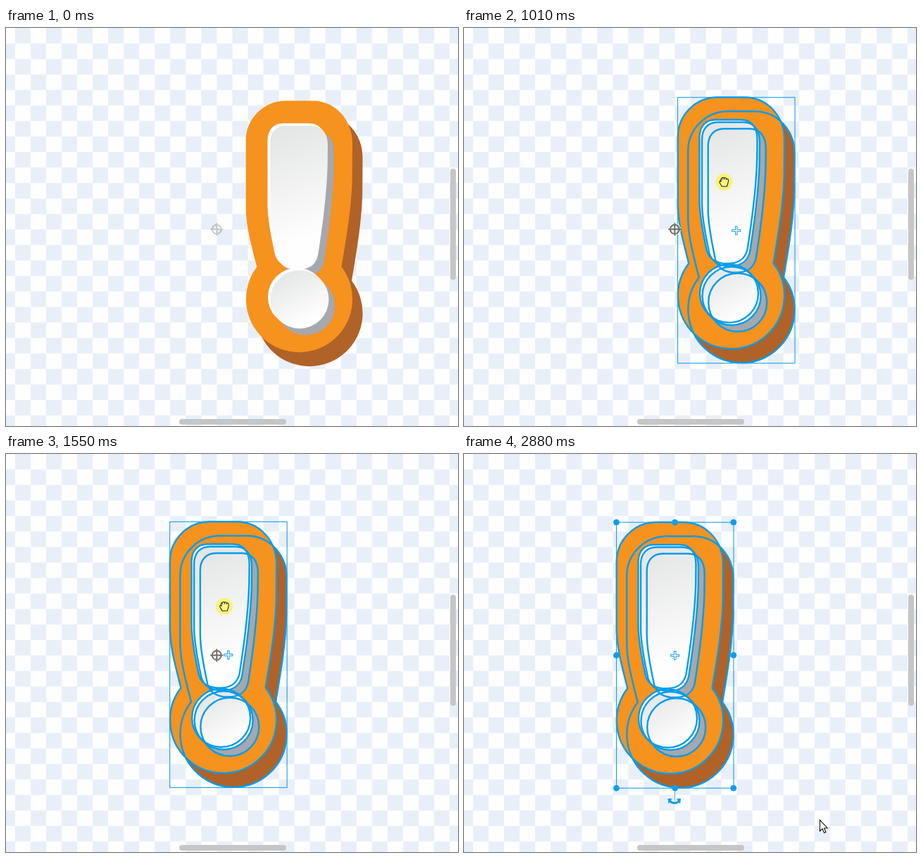
An HTML page for the animation above (2950 ms loop, 642 px wide and 566 px high).

```html
<!DOCTYPE html>
<html lang="en">
<head>
<meta charset="utf-8">
<title>Drag to centre</title>
<style>
  html, body { margin: 0; width: 100%; height: 100%; overflow: hidden; background: #fefefe; }
  svg { display: block; width: 642px; height: 566px; }
  .lines, .arc { fill: none; stroke: #049cec; stroke-width: 2.4; stroke-linejoin: round; }
  .arc { stroke-width: 3; }
  .box { fill: none; stroke: #149fee; stroke-width: 1.1; }
  #handles circle { fill: #119ded; }
  .bar { fill: #c6c6c6; }
  #target { fill: none; }
</style>
</head>
<body>
<svg viewBox="0 0 642 566">
  <defs>
    <pattern id="checks" x="12.9" y="0" width="44.08" height="44.08" patternUnits="userSpaceOnUse">
      <path fill="#e8eff8" d="M0 0h22.04v22.04H0zM22.04 22.04h22.04v22.04h-22.04z"/>
    </pattern>
    <linearGradient id="stemShade" gradientUnits="userSpaceOnUse" x1="390" y1="135" x2="445" y2="290">
      <stop offset="0" stop-color="#e3e5e4"/><stop offset="1" stop-color="#fefefe"/>
    </linearGradient>
    <linearGradient id="dotShade" x1=".25" y1=".1" x2=".65" y2=".85">
      <stop offset="0" stop-color="#e6e7e7"/><stop offset="1" stop-color="#fefefe"/>
    </linearGradient>
    <path id="body" d="M397 103.5H435C470 103.5 492 133 492 163L491.7 218C490 262 483 300 476.5 339.6A75.6 75.6 0 1 1 356.3 339.8C347 303 340.7 280 340.7 254V160C340.7 129 366 103.5 397 103.5Z"/>
    <path id="stem" d="M394 135.5H430C446 135.5 453.5 147 453.5 164L453.2 192C452 235 445 285 439.5 320C436 334 427 340 411 340C396 340 386 335 382 322C375 290 371.5 268 371.5 250V160C371.5 145 380 135.5 394 135.5Z"/>
    <circle id="dot" cx="413.5" cy="382.5" r="41.5"/>
    <g id="pair"><use href="#stem"/><use href="#dot"/></g>
    <path id="sight" d="M290.3 286.3h18M299.3 277.3v18M292.8 286.3a6.5 6.5 0 1 0 13 0a6.5 6.5 0 1 0-13 0"/>
  </defs>

  <rect width="642" height="566" fill="url(#checks)"/>

  <g id="mark">
    <use href="#body" x="14.5" y="20" fill="#b06228"/>
    <use href="#body" fill="#f6921e"/>
    <use href="#pair" x="12.2" y="12.8" fill="#a5a8ad"/>
    <use href="#stem" fill="#fff"/>
    <use href="#stem" x="3.5" y="3.5" fill="url(#stemShade)"/>
    <use href="#dot" fill="#fff"/>
    <use href="#dot" x="3.5" y="3.5" fill="url(#dotShade)"/>
    <g id="selection">
      <g class="lines">
        <use href="#body"/>
        <use href="#body" x="14.5" y="20"/>
        <use href="#pair"/>
        <use href="#pair" x="3.5" y="3.5"/>
        <use href="#pair" x="12.2" y="12.8"/>
      </g>
      <rect class="box" x="340.5" y="103.7" width="166.5" height="378"/>
    </g>
  </g>

  <g id="target">
    <use id="glow" href="#sight" stroke="#fff" stroke-opacity=".6" stroke-width="5"/>
    <use id="cross" href="#sight" stroke-width="2"/>
  </g>

  <g id="centre" fill="none">
    <path d="M417.2 293h13M423.7 286.5v13" stroke="#119ded" stroke-width="3.4"/>
    <path d="M418.2 293h11M423.7 287.5v11" stroke="#fff" stroke-width="1.4"/>
  </g>

  <g id="handles">
    <path d="M299.5 475v18" stroke="#5aaede"/>
    <path class="arc" d="M292 493.5q7 6 14 0"/>
    <path d="M289.5 490h6l-5 7.5zM308 490h-6l5 7.5z" fill="#119ded"/>
  </g>

  <rect class="bar" x="631" y="200" width="8" height="158" rx="4"/>
  <rect class="bar" x="246" y="556" width="152" height="8" rx="4"/>

  <g id="hand">
    <circle r="12" fill="#faf450" fill-opacity=".75"/>
    <path d="M-3.2 6.3C-4 3.5-6.8 2-6.4-.6C-6-1.9-4.6-1.4-4 -.6C-5-3.2-4.8-5.2-3.2-5C-2.4-6.9-.6-6.6 0-5.4C1.2-6.6 2.9-6.1 3.1-4.6C5-5.2 6.3-4 6.2-1.8C6.2 1.5 4.8 3.2 4.3 6.3Z"
      fill="#fbf58a" stroke="#222" stroke-width="1.1" stroke-linejoin="round"/>
    <path d="M-3.2-5l.7 2.3M0-5.4l.3 2.4M3.1-4.6v2" fill="none" stroke="#222" stroke-width=".9"/>
  </g>
  <path id="arrow" d="M.5.5V16.2L4 13L6.6 18.8L9 17.7L6.5 12H11.2Z" fill="#fff" stroke="#111" stroke-width="1.1"/>
</svg>
<script>
const LOOP = 2950;
const STEP = 68; // typical time between changes while something moves
const bursts = [[600, 1080], [1160, 1680], [1750, 1820], [2340, 2480], [2680, 2880]];

const $ = id => document.getElementById(id);
const show = (id, on) => $(id).style.display = on ? '' : 'none';
const move = (id, x, y) => $(id).setAttribute('transform', `translate(${x} ${y})`);
const ramp = (t, from, to) => Math.min(1, Math.max(0, (t - from) / (to - from)));
const bump = p => Math.sin(Math.PI * p);
const smooth = p => p * p * (3 - 2 * p);

// Latest change at or before t
function snap(t) {
  let last = 0;
  for (const [from, to] of bursts) {
    const count = Math.round((to - from) / STEP);
    for (let k = 0; k <= count; k++) {
      const at = 10 * Math.round((from + (to - from) * k / count) / 10 - .06);
      if (at <= t) last = at;
    }
  }
  return last;
}

// A quick pull, then a slower drift with a slight upward arc
function drag(t) {
  const pull = ramp(t, 870, 1080);
  const drift = ramp(t, 1080, 1680);
  return [
    -55.5 * pull - 68.5 * drift ** 1.1,
    -7.5 * pull + drift - 1.7 * bump(Math.sqrt(drift))
  ];
}

// The pointer comes from below, leads the pull, settles, then leaves
function pointer(t, [dx, dy]) {
  const away = 1 - smooth(ramp(t, 600, 810));
  const lead = 13.5 * bump(ramp(t, 870, 1080));
  const settle = 5 * bump(ramp(t, 1550, 1820));
  const leave = smooth(ramp(t, 2610, 2880));
  return [
    418 + dx + 10 * away - lead + settle + 211 * leave,
    224 + dy + 244 * away + 302.5 * leave
  ];
}

for (let i = 0; i < 9; i++) {
  if (i === 4) continue; // the middle has its own cross
  const knob = document.createElementNS('http://www.w3.org/2000/svg', 'circle');
  knob.setAttribute('cx', 216.4 + i % 3 * 83.2);
  knob.setAttribute('cy', 97.2 + Math.floor(i / 3) * 189);
  knob.setAttribute('r', 4.4);
  $('handles').append(knob);
}

function draw() {
  const t = snap(performance.now() % LOOP);
  const held = t >= 870;
  const released = t >= 2340;
  const gripping = t >= 810 && !released;
  const offset = drag(t);
  const at = pointer(t, offset);

  move('mark', ...offset);
  move('centre', ...offset);
  move('hand', ...at);
  move('arrow', ...at);
  show('selection', held);
  show('centre', held);
  show('handles', released);
  show('hand', gripping);
  show('arrow', t >= 600 && !gripping);
  show('glow', held);
  $('cross').setAttribute('stroke', held ? 'rgba(55,48,40,.7)' : 'rgba(0,0,0,.2)');
  $('target').style.opacity = 1 - ramp(t, 2340, 2480);
  requestAnimationFrame(draw);
}
draw();
</script>
</body>
</html>
```
